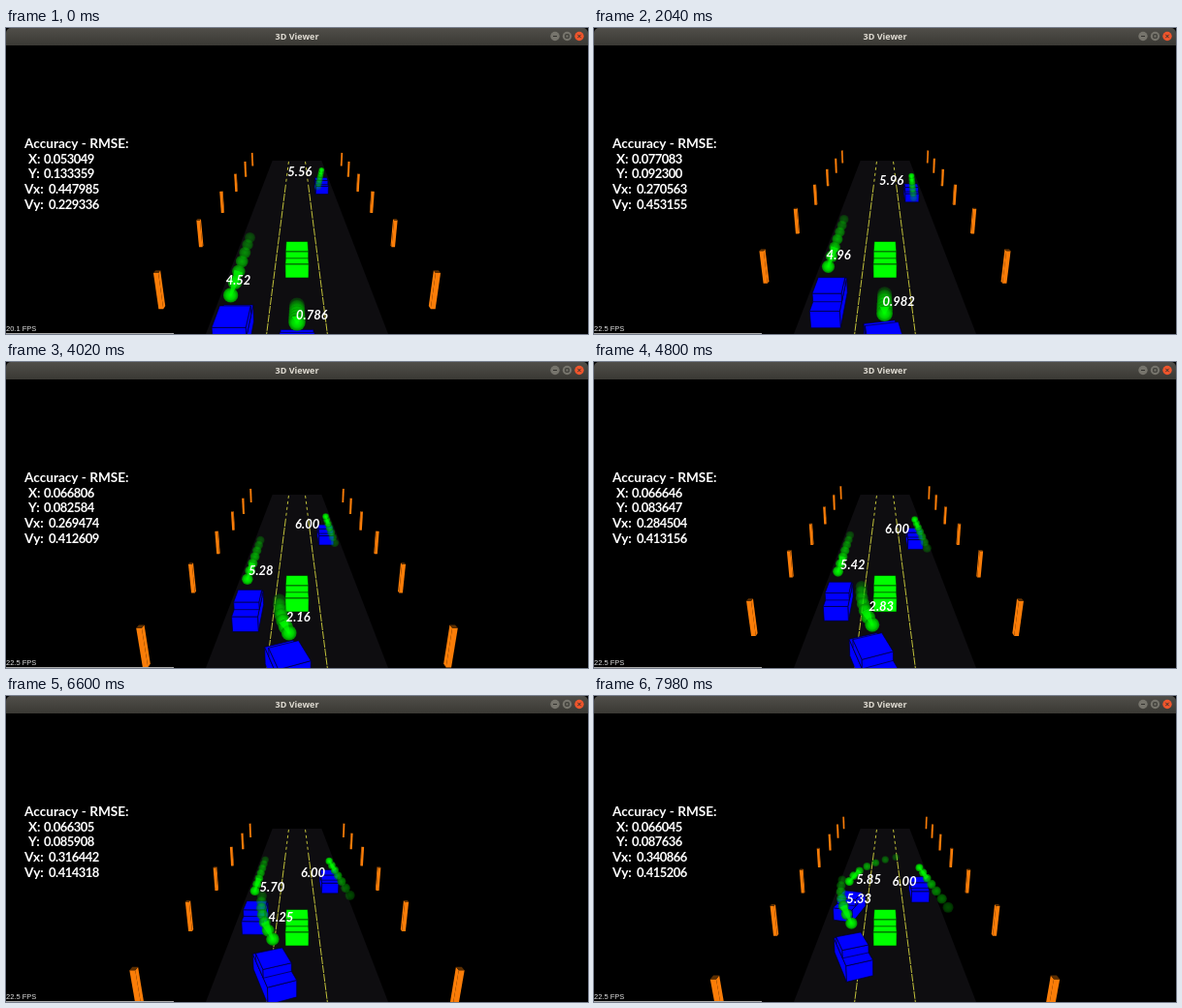
Recreate the animation shown at these times as an HTML page with a canvas. Size 600 by 316 pixels, loop 8000 ms.

```html
<!DOCTYPE html>
<html lang="en">
<head>
<meta charset="utf-8">
<title>3D Viewer</title>
<style>
  html, body { margin: 0; width: 100%; height: 100%; overflow: hidden; background: #000; }
  canvas { display: block; }
</style>
</head>
<body>
<canvas id="stage" width="600" height="316"></canvas>
<script>
const ctx = document.getElementById('stage').getContext('2d');
const LOOP = 8000, STEP = 60, TICKS_PER_STEP = 0.582, FIRST_TICK = 3, LAST_TICK = 77, DT = 1 / 30;
const FILTER_LAG = 10; // ticks by which the tracker trails the true motion

// Camera 26 m behind the ego car and 15 m up, pitched down. x is forward, y is left.
const COS = 0.9593, SIN = 0.2822, FOCAL = 326, HORIZON = 71;
const depth = (x, z) => (x + 26) * COS + (15 - z) * SIN;
function project(x, y, z = 0) {
  const d = depth(x, z);
  return [300 - FOCAL * y / d, HORIZON + FOCAL * (15 - z) / (COS * d)];
}
const mix = (a, b, f) => a + (b - a) * f;

// Errors start low, peak, then settle.
const RMSE_TICKS = [0, 13, 27, LAST_TICK];
const RMSE = {
  X: [0.053049, 0.087121, 0.067046, 0.066045],
  Y: [0.133359, 0.103612, 0.080988, 0.087636],
  Vx: [0.447985, 0.294197, 0.246929, 0.340866],
  Vy: [0.229336, 0.494520, 0.411789, 0.415206],
};
function rmseAt(values, tick) {
  const i = tick < RMSE_TICKS[1] ? 0 : tick < RMSE_TICKS[2] ? 1 : 2;
  return mix(values[i], values[i + 1], (tick - RMSE_TICKS[i]) / (RMSE_TICKS[i + 1] - RMSE_TICKS[i]));
}

// controls: [time, acceleration, steering]; guess: first estimated share of the true speed;
// label: offset from the marker at both ends of the loop; bend: turn of the predicted path.
const traffic = [
  { x: 25, y: -4, v: -6, controls: [], guess: 0.927, label: [[-35, 2], [-28, 14]],
    drift: 0.12, bend: () => 0 },
  { x: -10, y: 4, v: 5, controls: [[0.5, 0.5, 0], [2.2, 0, -0.2]], guess: 0.904, label: [[-5, -15], [7, -2]],
    drift: 0, bend: state => 1.5 * state.yaw },
  { x: -12, y: 0, v: 1, controls: [[0.5, 2, 1], [1, 2.5, 0]], guess: 0.786, label: [[-1, -8], [-5, -25]],
    drift: 0, bend: state => -0.9 * state.angle },
];

function drive(car, count) {
  let { x, y, v } = car, angle = 0, accel = 0, steer = 0, next = 0;
  const states = [];
  for (let i = 0; i <= count; i++) {
    states.push({ x, y, v, angle, yaw: v * steer / 2 });
    const control = car.controls[next];
    if (control && i * DT >= control[0] - 1e-6) {
      [, accel, steer] = control;
      next++;
    }
    x += v * Math.cos(angle) * DT;
    y += v * Math.sin(angle) * DT;
    angle += v * steer * DT / 2;
    v += accel * DT;
  }
  return states;
}
for (const car of traffic) car.states = drive(car, FIRST_TICK + LAST_TICK + 1);

function estimate(car, tick) {
  const state = car.states[Math.max(0, FIRST_TICK + tick - FILTER_LAG)];
  return {
    speed: state.v * (1 - (1 - car.guess) * Math.exp(-tick / 8)),
    heading: state.angle + car.drift * mix(-1, 1, tick / LAST_TICK),
    turn: car.bend(state),
  };
}

function polygon(points, fill, stroke) {
  ctx.beginPath();
  points.forEach(p => ctx.lineTo(p[0], p[1]));
  ctx.closePath();
  ctx.fillStyle = fill;
  ctx.fill();
  if (stroke) {
    ctx.strokeStyle = stroke;
    ctx.lineWidth = 0.7;
    ctx.stroke();
  }
}

function box(pose, length, width, z0, z1, fill, stroke, topFill = fill) {
  const c = Math.cos(pose.angle), s = Math.sin(pose.angle);
  const corners = [[-1, -1], [1, -1], [1, 1], [-1, 1]].map(([a, b]) => {
    const u = a * length / 2, w = b * width / 2;
    return [pose.x + u * c - w * s, pose.y + u * s + w * c];
  });
  const low = corners.map(p => project(...p, z0));
  const high = corners.map(p => project(...p, z1));
  for (let i = 0; i < 4; i++) {
    const j = (i + 1) % 4, a = low[i], b = low[j], h = high[j];
    const cross = (b[0] - a[0]) * (h[1] - a[1]) - (b[1] - a[1]) * (h[0] - a[0]);
    if (cross < 0) polygon([a, b, h, high[i]], fill, stroke);
  }
  polygon(high, topFill, stroke);
}

function drawCar(pose, fill, stroke) {
  box(pose, 4, 2, 0, 4 / 3, fill, stroke);
  box(pose, 2, 2, 4 / 3, 2, fill, stroke);
}

function drawRoad(tick) {
  polygon([project(50, 6), project(50, -6), project(-18, -6), project(-18, 6)], '#0e0d10');
  ctx.strokeStyle = '#d6d640';
  ctx.lineWidth = 0.9;
  for (const side of [2, -2]) {
    const line = (from, to, dash) => {
      ctx.setLineDash(dash);
      ctx.beginPath();
      ctx.moveTo(...project(from, side));
      ctx.lineTo(...project(to, side));
      ctx.stroke();
    };
    line(49, 28, [3, 3]);
    line(28, -18, [8, 1]);
  }
  ctx.setLineDash([]);
  for (let x = 50 - (6 + 25 * DT * tick) % 10; x > -19; x -= 10)
    for (const y of [10, -10])
      box({ x, y, angle: 0 }, 0.35, 0.35, 0, 3, '#fa7d08', null, '#5c2e00');
}

function sphere([x, y], r, alpha) {
  const shade = ctx.createRadialGradient(x, y, 0, x, y, r);
  shade.addColorStop(0, '#00ff00');
  shade.addColorStop(0.6, '#00d000');
  shade.addColorStop(1, '#008000');
  ctx.globalAlpha = alpha;
  ctx.fillStyle = shade;
  ctx.beginPath();
  ctx.arc(x, y, r, 0, 7);
  ctx.fill();
  ctx.globalAlpha = 1;
}

function drawPrediction(pose, { speed, heading, turn }) {
  const steps = 6, stride = speed * 1.8 / steps;
  let { x, y } = pose;
  const path = [];
  for (let i = 0; i <= steps; i++) {
    path.push({ at: project(x, y, 3.5), r: FOCAL * 0.45 / depth(x, 3.5) });
    const a = heading + turn * (i + 0.5) / steps;
    x += stride * Math.cos(a);
    y += stride * Math.sin(a);
  }
  for (let i = steps; i >= 0; i--) sphere(path[i].at, path[i].r, 1 - 0.7 * i / steps);

  // velocity arrow, flaring away from the marker
  const { at: [ax, ay], r } = path[0], [bx, by] = path[2].at;
  const len = Math.hypot(bx - ax, by - ay);
  const nx = (ay - by) / len * r, ny = (bx - ax) / len * r;
  ctx.globalAlpha = 0.7;
  polygon([[ax + nx * 0.15, ay + ny * 0.15], [bx + nx * 0.6, by + ny * 0.6],
           [bx - nx * 0.6, by - ny * 0.6], [ax - nx * 0.15, ay - ny * 0.15]], '#00ff00');
  ctx.globalAlpha = 1;
}

function text(str, x, y, font, color = '#fff', align = 'left', spacing = '0px') {
  ctx.font = font;
  ctx.fillStyle = color;
  ctx.textAlign = align;
  ctx.letterSpacing = spacing;
  ctx.fillText(str, x, y);
}

function drawSpeed(car, pose, speed, tick) {
  const [x, y] = project(pose.x, pose.y, 3.5), [from, to] = car.label, f = tick / LAST_TICK;
  text(Math.abs(speed).toPrecision(3), x + mix(from[0], to[0], f), y + mix(from[1], to[1], f) + 4.5,
    'italic 700 13px Lato, sans-serif');
}

function drawHud(tick) {
  text('Accuracy - RMSE:', 19, 124, '700 13.6px Lato, sans-serif');
  Object.entries(RMSE).forEach(([name, values], i) => {
    const y = 139.7 + i * 15.7, indent = name.length === 1;
    text(name + ':', indent ? 23 : 19, y, '700 13.6px Lato, sans-serif');
    text(rmseAt(values, tick).toFixed(6), indent ? 39 : 44, y,
      '700 13px Lato, sans-serif', '#fff', 'left', '-0.5px');
  });
  const fps = 22.5 - 2.4 * Math.exp(-tick / 5);
  text(fps.toFixed(1) + ' FPS', 0, 312.5, '7.5px "Liberation Sans", sans-serif', '#e0e0e0');
  ctx.fillStyle = '#aaa';
  ctx.fillRect(0, 315, 173, 1);
}

function drawTitleBar() {
  const shade = ctx.createLinearGradient(0, 0, 0, 18);
  shade.addColorStop(0, '#504e49');
  shade.addColorStop(1, '#3a3934');
  ctx.fillStyle = shade;
  ctx.beginPath();
  ctx.roundRect(0, 0, 600, 18, [5, 5, 0, 0]);
  ctx.fill();
  text('3D Viewer', 300, 12, '700 9px "Open Sans", sans-serif', '#dfdbd2', 'center');
  ctx.lineWidth = 1;
  ['#76746c', '#76746c', '#f0552c'].forEach((color, i) => {
    const x = 566 + 12.5 * i;
    ctx.fillStyle = color;
    ctx.beginPath();
    ctx.arc(x, 8.5, 4.7, 0, 7);
    ctx.fill();
    ctx.strokeStyle = '#33322e';
    ctx.beginPath();
    if (i === 0) { ctx.moveTo(x - 2, 8.5); ctx.lineTo(x + 2, 8.5); }
    if (i === 1) ctx.rect(x - 1.7, 6.8, 3.4, 3.4);
    if (i === 2) {
      ctx.moveTo(x - 1.7, 6.8); ctx.lineTo(x + 1.7, 10.2);
      ctx.moveTo(x + 1.7, 6.8); ctx.lineTo(x - 1.7, 10.2);
    }
    ctx.stroke();
  });
}

function draw(ms) {
  const tick = Math.floor(Math.floor(ms / STEP) * TICKS_PER_STEP + 0.5);
  ctx.fillStyle = '#000';
  ctx.fillRect(0, 0, 600, 316);
  drawRoad(tick);

  const poses = traffic.map(car => car.states[FIRST_TICK + tick]);
  const estimates = traffic.map(car => estimate(car, tick));
  const blue = pose => drawCar(pose, '#0000ff', '#000030');
  blue(poses[0]);
  blue(poses[1]);
  drawCar({ x: 0, y: 0, angle: 0 }, '#00ff00', '#002800');
  blue(poses[2]);
  traffic.forEach((car, i) => drawPrediction(poses[i], estimates[i]));
  traffic.forEach((car, i) => drawSpeed(car, poses[i], estimates[i].speed, tick));
  drawHud(tick);
  drawTitleBar();
}

const start = performance.now();
function frame() {
  draw((performance.now() - start) % LOOP);
  requestAnimationFrame(frame);
}
frame();
</script>
</body>
</html>
```
